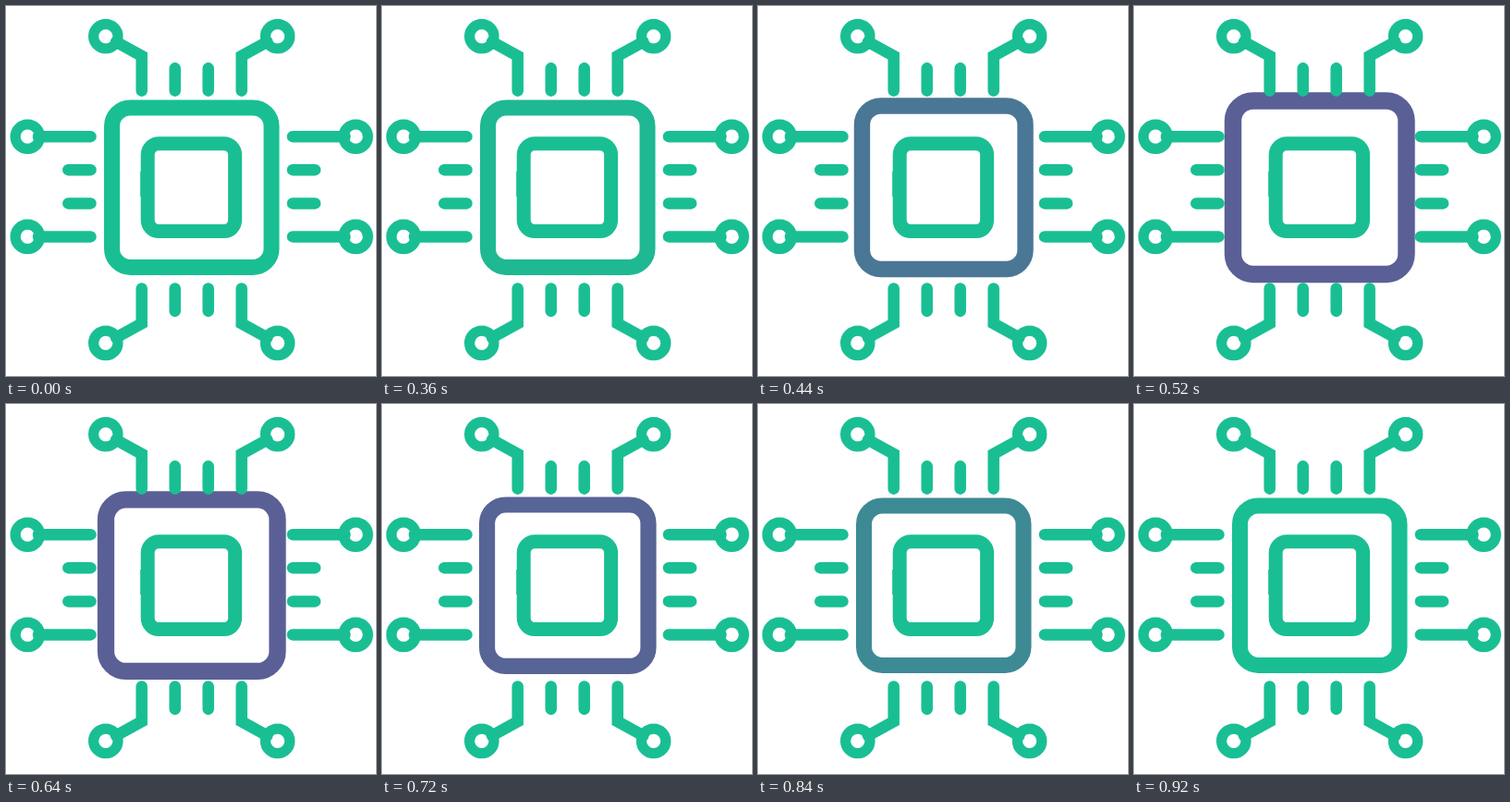
Write an HTML page that moves like this. It is 400 by 400 pixels and loops after 1200 ms.

```html
<!DOCTYPE html>
<html lang="en">
<head>
<meta charset="utf-8">
<title>Pulsing chip</title>
<style>
  html, body { margin: 0; width: 100%; height: 100%; overflow: hidden; background: #fff; }
  svg { display: block; width: 100%; height: 100%; }
</style>
</head>
<body>
<svg viewBox="0 0 400 400" fill="none" stroke="#19bf93">
  <defs>
    <g id="topCorner">
      <path d="M146.7 91.7V54L119 38.8M182.7 67.3V91.7" stroke-width="12.5" stroke-linecap="round"/>
      <circle cx="107.8" cy="32.8" r="13.2" stroke-width="11.2"/>
    </g>
    <g id="sideCorner">
      <path d="M35 141.2H91.5M67.3 177.2H91.5" stroke-width="12.5" stroke-linecap="round"/>
      <circle cx="23.3" cy="141.2" r="13.2" stroke-width="11.2"/>
    </g>
    <g id="leftHalf">
      <use href="#topCorner"/>
      <use href="#topCorner" transform="matrix(1 0 0 -1 0 397.2)"/>
      <use href="#sideCorner"/>
      <use href="#sideCorner" transform="matrix(1 0 0 -1 0 390.6)"/>
    </g>
  </defs>
  <rect id="shell" x="-86.25" y="-86.25" width="172.5" height="172.5" rx="20" stroke-width="17"/>
  <rect x="153.2" y="148.8" width="94.4" height="94.8" rx="12" stroke-width="15"/>
  <path d="M146.2 179V206" stroke-width="2"/>
  <use href="#leftHalf"/>
  <use href="#leftHalf" transform="matrix(-1 0 0 1 401.4 0)"/>
</svg>
<script>
  const LOOP = 1200, STEP = 40;
  const GREEN = [25, 191, 147], PURPLE = [90, 96, 150];
  const shell = document.getElementById('shell');

  const progress = (t, start, end) => Math.min(1, Math.max(0, (t - start) / (end - start)));
  const smooth = x => x * x * (3 - 2 * x);

  function draw(now) {
    const t = Math.floor(now % LOOP / STEP) * STEP;
    const swell = smooth(progress(t, 385, 560)) - smooth(progress(t, 585, 755));
    const tint = smooth(progress(t, 335, 490)) - progress(t, 650, 920) ** 2.3;
    const color = GREEN.map((c, i) => Math.round(c + (PURPLE[i] - c) * tint));
    shell.setAttribute('transform', `translate(200.75 196.2) scale(${1 + 0.1 * swell})`);
    shell.setAttribute('stroke', `rgb(${color})`);
  }

  let start;
  function tick(now) {
    start ??= now;
    draw(now - start);
    requestAnimationFrame(tick);
  }
  draw(0);
  requestAnimationFrame(tick);
</script>
</body>
</html>
```
